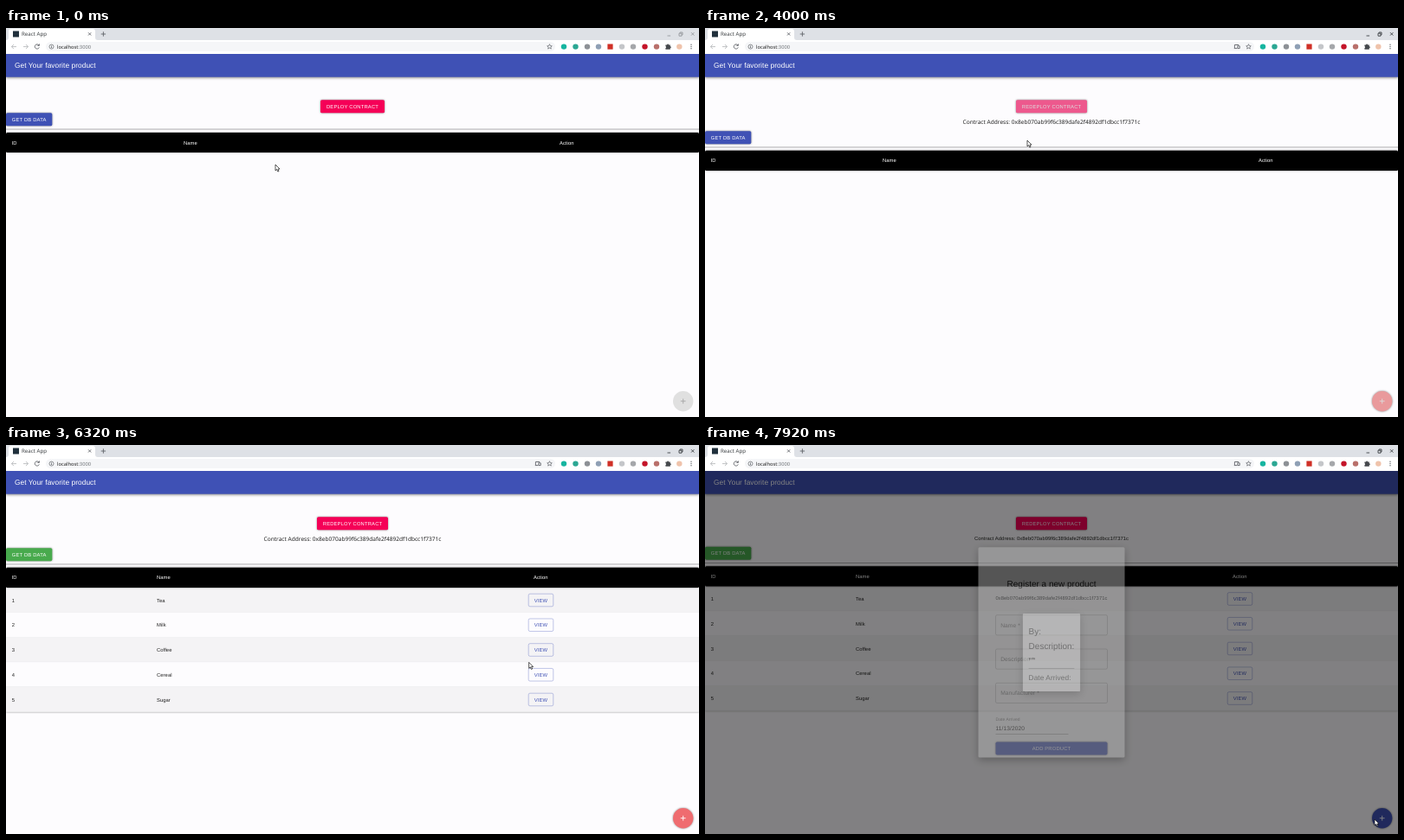
An HTML page for the animation above (8000 ms loop, 800 by 450 pixels).

```html
<!DOCTYPE html>
<html lang="en">
<head>
<meta charset="utf-8">
<title>React App</title>
<style>
  html, body { margin: 0; width: 100%; height: 100%; overflow: hidden; background: #fdfcfe; }
  svg { display: block; width: 800px; height: 450px; }
  text { font: 5.83px "Liberation Sans", Arial, sans-serif; letter-spacing: .0107em; text-rendering: geometricPrecision; fill: #212121; white-space: pre; }
  .ui { font-family: "Noto Sans", "Open Sans", sans-serif; letter-spacing: 0; }
  .btn { letter-spacing: .0286em; text-anchor: middle; fill: #fff; }
  .mid { text-anchor: middle; }
  .white { fill: #fff; }
  .h3 { font-size: 20px; letter-spacing: 0; }
  .h5 { font-size: 10px; letter-spacing: 0; }
  .h6 { font-size: 8.33px; letter-spacing: .0075em; }
  .body { font-size: 6.67px; }
  .b { font-weight: 700; }
  .label { fill: #0000008a; }
  .line { fill: none; stroke: #5f6368; stroke-width: .9; }
  .raised { filter: drop-shadow(0 .8px .8px #0007); }
  .paper { fill: #fff; filter: drop-shadow(0 3px 5px #0008); }
</style>
</head>
<body>
<svg id="stage" viewBox="0 0 800 450"></svg>
<script>
const address = '0x8eb070ab99f6c389dafe2f4892df1dbcc1f7371c';
const products = ['Tea', 'Milk', 'Coffee', 'Cereal', 'Sugar'];
const INDIGO = [63, 81, 181], PINK = [245, 0, 87], DARK_PINK = [190, 8, 78];
const GRAY = [224, 224, 224], GREEN = [72, 170, 77], RED = [239, 108, 112];
const WHITE = [255, 255, 255], DISABLED = [166, 166, 166];

const text = (x, y, s, cls = '', attrs = '') => `<text x="${x}" y="${y}" class="${cls}" ${attrs}>${s}</text>`;
const rect = (x, y, w, h, fill, attrs = '') => `<rect x="${x}" y="${y}" width="${w}" height="${h}" fill="${fill}" ${attrs}/>`;
const dot = (x, y, r, fill, attrs = '') => `<circle cx="${x}" cy="${y}" r="${r}" fill="${fill}" ${attrs}/>`;
const line = (d, attrs = '') => `<path class="line" d="${d}" ${attrs}/>`;
const group = (id, body, attrs = '') => `<g id="${id}" ${attrs}>${body}</g>`;

function browser() {
  const pale = 'style="stroke:#b8babd"';
  const extensions = [[644, '#16b5a0'], [657.5, '#2ba793'], [671, '#8d9196'], [684, '#8fa0b5'],
    [711, '#c4c6c9'], [724, '#a5a7aa'], [737.5, '#c41429'], [751, '#b9706b'], [777.3, '#efc3ab']];
  return rect(0, 0, 800, 30, '#fff') + rect(0, 0, 800, 14, '#dee1e6')
    + '<path d="M0 14Q3 14 3 11V4Q3 1 6 1H100Q103 1 103 4V11Q103 14 106 14Z" fill="#fff"/>'
    + rect(8, 3.5, 7, 7, '#20303c') + text(18, 9.2, 'React App', 'ui', 'style="font-size:6.15px;fill:#3c4043"')
    + line('M95 5.3l3.2 3.2m0-3.2l-3.2 3.2M112.4 4.3v5.4m-2.7-2.7h5.4')
    + group('controls', line('M763.5 9h3.6M777 6.2h3v3h-3zM778 6v-1h3v3h-1M791 5.2l3.4 3.4m0-3.4l-3.4 3.4', 'style="stroke:inherit"'))
    + line('M12 21.6H6.4m2.5-2.5l-2.5 2.5l2.5 2.5M20 21.6h5.5m-2.5-2.5l2.5 2.5l-2.5 2.5', pale)
    + line('M38 20a2.6 2.6 0 1 0 .3 2.4M38.4 18.4v2h-2')
    + rect(46, 16, 588, 11, '#f5f6f8', 'rx="5.5"')
    + dot(52.5, 21.6, 2.5, 'none', 'stroke="#5f6368" stroke-width=".7"') + line('M52.5 21.2v1.8m0-3v.6')
    + text(59, 23.7, 'localhost<tspan fill="#6d7175">:3000</tspan>', 'ui', 'style="font-size:5.75px"')
    + group('device', line('M611.4 23.2v-3.7h4.8M610.8 23.6h3.4M614.8 20.8h2.4v2.8h-2.4z'))
    + line('M627.5 18.7l.8 1.9 2 .2-1.5 1.3.5 2-1.8-1.1-1.8 1.1.5-2-1.5-1.3 2-.2z', 'style="stroke-width:.7"')
    + extensions.map(([x, color]) => dot(x, 21.6, 3.2, color)).join('')
    + rect(694.4, 18.5, 6.2, 6.2, '#cf3027')
    + '<path d="M761.4 19.4h1.7a1 1 0 0 1 2 0h1.7v1.8a1 1 0 0 1 0 2v1.6h-5.4v-1.7a1 1 0 0 0 0-1.9z" fill="#45484c"/>'
    + [19.2, 21.5, 23.8].map(y => dot(791, y, .7, '#5f6368')).join('');
}

function table() {
  const rows = products.map((name, i) => {
    const y = 144.1 + 28.75 * i, base = y + 16.6;
    return rect(0, y, 800, 28.75, i % 2 ? '#fdfcfe' : '#f4f3f5') + rect(0, y + 28.35, 800, .4, '#dedde0')
      + text(6.7, base, i + 1) + text(174, base, name)
      + `<g class="view">${rect(603.2, y + 7.2, 28.6, 14.6, 'none', 'rx="1.67" stroke-width=".5"')}${text(617.5, base, 'VIEW', 'btn')}</g>`;
  }).join('');
  return rect(0, 116.7, 800, .7, '#89888b')
    + group('rows', rect(0, 144, 800, 144, '#fff', 'class="raised"') + rows)
    + rect(0, 120.9, 800, 23.2, '#000', 'rx="1.5" class="raised"')
    + text(6.7, 134.6, 'ID', 'white') + text(205, 134.6, 'Name', 'white', 'id="nameHead"')
    + text(639, 134.6, 'Action', 'white', 'id="actionHead"');
}

function card(id, width, title, maker, quote, date) {
  const x = 400 - width / 2, left = x + 6.7, shift = title ? 0 : -11.7, top = title ? 183.3 : 195;
  return group(id, rect(x, top, width, title ? 113.4 : 90, '#fff', 'class="paper" rx="1"')
    + `<g transform="translate(0 ${shift})">`
    + text(left, 208.6, title, 'h3')
    + text(left, 230.5, `By: <tspan class="b">${maker}</tspan>`, 'h5') + text(left, 247.3, 'Description:', 'h5')
    + text(left, 263.5, `"${quote}"`, 'h6 b') + rect(left, 269.8, width - 13.4, .7, '#88888a')
    + text(left, 283.5, 'Date Arrived: ' + date, 'h6') + '</g>');
}

function form() {
  const field = (y, label) => rect(335.5, y, 129, 23.2, 'none', 'rx="1.67" stroke="#0006" stroke-width=".5"')
    + text(341.2, y + 13.9, label + ' *', 'body label');
  return group('form', rect(315.5, 118.3, 169, 243.3, '#fff', 'class="paper" rx="1.67"')
    + text(400, 163.5, 'Register a new product', 'h5 mid') + text(400, 178.7, address, 'mid')
    + field(196.7, 'Name') + field(236, 'Description') + field(275.3, 'Manufacturer')
    + text(335.5, 319, 'Date Arrived', 'label', 'style="font-size:5px"')
    + text(335.5, 329.8, '11/13/2020', 'body') + rect(335.5, 334, 84, .5, '#0008')
    + rect(335.5, 343.5, 129, 15, '#3f51b5', 'rx="1.67" class="raised"') + text(400, 353.1, 'ADD PRODUCT', 'btn'));
}

const shade = id => rect(0, 30, 800, 420, '#000', `id="${id}"`);

stage.innerHTML = rect(0, 0, 800, 450, '#fdfcfe')
  + rect(0, 28, 800, 28.7, '#3f51b5', 'style="filter:drop-shadow(0 1px 1.5px #0007)"') + browser()
  + text(10, 46.2, 'Get Your favorite product', 'h6 white')
  + rect(363, 83.3, 74, 15, '', 'id="deploy" rx="1.67"') + text(400, 93.1, '', 'btn', 'id="deployText"')
  + text(400, 111, 'Contract Address: ' + address, 'mid', 'id="contract"')
  + group('lower', rect(0, 98.3, 53.3, 15, '', 'id="db" rx="1.67" class="raised"')
    + text(26.7, 108, 'GET DB DATA', 'btn', 'id="dbText"') + table())
  + dot(781.7, 431.7, 11.7, '', 'id="fab" class="raised"')
  + '<path id="plus" d="M781.7 428.8v5.8m-2.9-2.9h5.8" stroke-width=".9"/>'
  + shade('formShade') + form() + shade('cardShade')
  + card('tea', 117.6, 'Tea', 'Brindol', 'A refreshing experience', '2020-11-13')
  + card('cereal', 107.6, 'Cereal', 'Tavorros', 'Yummy in Tummy', '2020-11-13')
  + card('empty', 66.2, '', '', '', '')
  + '<path id="cursor" d="M0 0V7L1.6 5.5 2.8 8.1 4 7.6 2.9 5.1H5Z" fill="#fff" stroke="#111" stroke-width=".7"/>';

const $ = Object.fromEntries([...stage.querySelectorAll('[id]')].map(el => [el.id, el]));
const views = [...stage.querySelectorAll('.view')];

// Time in ms, then the pointer's position.
const pointer = [[80, 311, 158], [640, 403, 94], [1040, 403, 94], [1280, 374, 131], [2720, 374, 131],
  [2880, 372, 130], [4000, 372, 130], [4480, 30, 127], [4640, 30, 127], [5200, 606, 183], [5520, 606, 183],
  [5680, 540, 215], [5760, 540, 215], [6640, 631, 267], [6800, 631, 267], [7120, 234, 257],
  [7200, 234, 257], [7680, 773, 433], [8000, 773, 433]];

const lerp = (a, b, k) => a + (b - a) * k;
const mix = (a, b, k) => `rgb(${a.map((v, i) => Math.round(lerp(v, b[i], k)))})`;
const blend = (a, b, k) => a.map((v, i) => lerp(v, b[i], k));
const ramp = (t, from, to) => Math.min(1, Math.max(0, (t - from) / (to - from)));
const show = (el, on) => el.style.display = on ? '' : 'none';

function pointerAt(t) {
  const i = pointer.findIndex(p => p[0] >= t), b = pointer[i], a = pointer[Math.max(0, i - 1)];
  const k = ramp(t, a[0], b[0] + (a === b)), s = k * k * (3 - 2 * k);
  return [lerp(a[1], b[1], s), lerp(a[2], b[2], s)];
}

function render(t) {
  const deploying = t >= 800, deployed = t >= 4000, loaded = t >= 4720, restyled = t >= 7840;
  const ready = deployed ? ramp(t, 3800, 4130) : 0;
  const busy = Math.max(...[4560, 5200, 6720].map(c => ramp(t, c, c + 160) * (1 - ramp(t, c + 160, c + 320))));
  const opening = ramp(t, 7760, 7920);

  $.controls.setAttribute('stroke', t >= 880 ? '#3c4043' : '#96999d');
  show($.device, t >= 880);

  const width = deployed ? 82 : deploying ? 90 : 74;
  const off = deployed ? 1 - ready : ramp(t, 720, 960);
  $.deploy.setAttribute('x', 400 - width / 2);
  $.deploy.setAttribute('width', width);
  $.deploy.setAttribute('fill', mix(deployed ? PINK : blend(PINK, DARK_PINK, ramp(t, 480, 640)), GRAY, off));
  $.deploy.setAttribute('class', off < .9 ? 'raised' : '');
  $.deployText.textContent = deployed ? 'REDEPLOY CONTRACT' : deploying ? 'DEPLOYING... CONTRACT' : 'DEPLOY CONTRACT';
  $.deployText.style.fill = mix(WHITE, DISABLED, off);

  show($.contract, deployed);
  $.contract.setAttribute('class', restyled ? 'mid' : 'mid ui');
  $.contract.style.fontSize = restyled ? '5.83px' : '6.55px';
  $.contract.setAttribute('y', restyled ? 110.3 : 111);
  $.lower.setAttribute('transform', `translate(0 ${restyled ? 19.4 : deployed ? 20.9 : 0})`);

  $.db.setAttribute('fill', mix(loaded ? GREEN : INDIGO, GRAY, busy));
  $.dbText.style.fill = mix(WHITE, DISABLED, busy);
  show($.rows, loaded);
  $.nameHead.setAttribute('x', loaded ? 174 : 205);
  $.actionHead.setAttribute('x', loaded ? 609 : 639);
  for (const view of views) {
    view.firstChild.setAttribute('stroke', busy ? '#0003' : '#3f51b5a0');
    view.lastChild.style.fill = busy ? '#00000042' : '#3f51b5';
  }

  $.fab.setAttribute('fill', mix(blend(GRAY, RED, ready), INDIGO, ramp(t, 7600, 7760)));
  $.fab.setAttribute('class', deployed ? 'raised' : '');
  $.plus.setAttribute('stroke', mix(DISABLED, WHITE, ready));

  const tea = ramp(t, 5280, 5520) * (1 - ramp(t, 5680, 5920));
  const cereal = ramp(t, 6880, 7040) * (1 - ramp(t, 7120, 7250));
  const opacity = { tea, cereal, empty: .3 * opening, form: .49 * opening, formShade: .25 * opening,
    cardShade: Math.max(tea / 2, cereal / 2, .32 * opening) };
  for (const id in opacity) {
    $[id].style.opacity = opacity[id];
    show($[id], opacity[id] > 0);
  }
  $.cursor.setAttribute('transform', `translate(${pointerAt(t)})`);
}

const STEP = 80, LOOP = 8000;
const start = performance.now();
function tick() {
  const t = (performance.now() - start) % LOOP;
  render(Math.floor(t / STEP) * STEP);
  requestAnimationFrame(tick);
}
tick();
</script>
</body>
</html>
```
